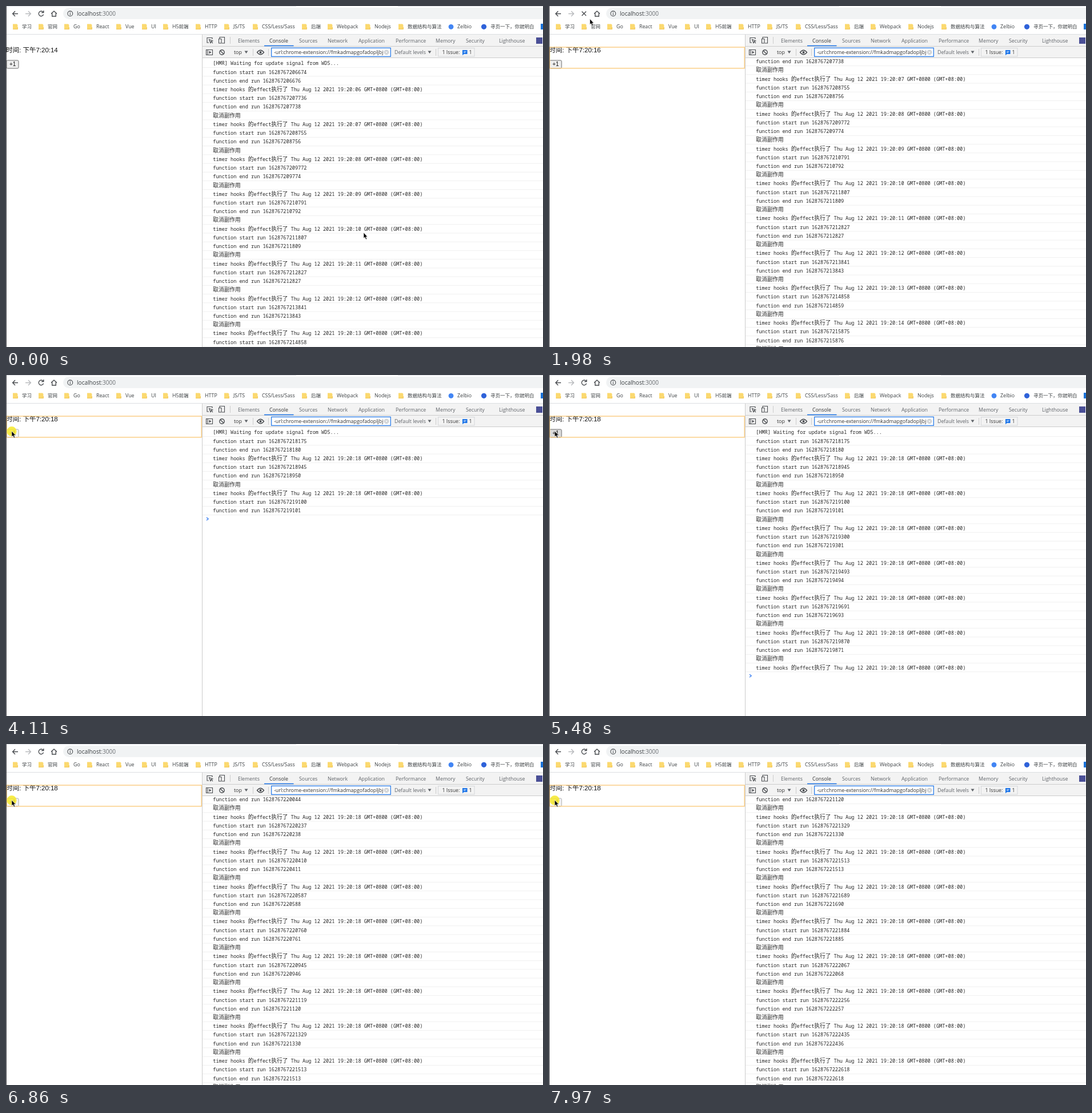
Recreate the animation shown at these times as an HTML page. Size 940x596 px, loop 8000 ms.

```html
<!DOCTYPE html>
<html lang="zh">
<head>
<meta charset="utf-8">
<title>Timer hooks console</title>
<style>
  html, body { margin: 0; width: 100%; height: 100%; overflow: hidden; background: #fff; }
  svg { display: block; width: 940px; height: 596px; }
  text { font-family: "Open Sans", "Noto Sans CJK SC", "Noto Sans CJK", sans-serif; font-size: 8.8px; fill: #3c4043; white-space: pre; }
  .url { font-size: 10.1px; }
  #bookmarks tspan { font-size: 8.5px; }
  .tool text { fill: #5f6368; }
  .tool .dark { fill: #333; }
  .page text { font-family: "Liberation Sans", "Noto Sans CJK SC", "Noto Sans CJK", sans-serif; font-size: 11.5px; fill: #111; }
  .page .label { font-size: 10px; text-anchor: middle; }
  .log text { font-family: "Noto Sans Mono", "Noto Sans CJK SC", "Noto Sans CJK", monospace; font-size: 8.56px; fill: #262626; }
  .log tspan { font-size: 9.7px; }
  .log path { stroke: #f0f0f0; }
  .icon { fill: none; stroke: #4a4d51; stroke-width: 1.4; }
  .sep { stroke: #ccc; fill: none; }
</style>
</head>
<body>
<svg viewBox="0 0 940 596">
  <defs>
    <clipPath id="logClip"><rect x="344" y="91" width="596" height="505"/></clipPath>
    <clipPath id="filterClip"><rect id="filterWindow" x="466" y="73" height="16"/></clipPath>
  </defs>
  <rect width="940" height="596" fill="#fff"/>

  <!-- address bar -->
  <path d="M0 .5H508M686 .5H940" stroke="#dee1e6"/>
  <rect x="100" y="3" width="860" height="20" rx="10" fill="#f1f3f4"/>
  <circle id="reloadHover" cx="61.5" cy="13" r="10" fill="#eceef0"/>
  <g class="icon">
    <path d="M21 13.5H12M16 9L11.6 13.5L16 18"/>
    <path d="M34 13.5H43M39 9L43.4 13.5L39 18" stroke="#b8babd"/>
    <path id="reload" d="M65 10.8A4.3 4.3 0 1 0 65.6 14.8M65.8 8V11.6H62"/>
    <path id="stop" d="M57.5 9.5L65 17M65 9.5L57.5 17"/>
    <path d="M79 13.6L84 9L89 13.6M80.7 12.6V18H87.3V12.6"/>
    <circle cx="112.3" cy="13.3" r="4.4" stroke-width="1.1"/>
    <path d="M112.3 12.6V16M112.3 10.6V11.7" stroke-width="1.1"/>
  </g>
  <text class="url" x="124" y="16.8">localhost<tspan fill="#6b6f73">:3000</tspan></text>
  <g id="bookmarks"></g>
  <circle cx="779" cy="36.3" r="4.4" fill="#4285f4"/>
  <circle cx="836.5" cy="36.3" r="4.6" fill="#2f62d9"/>
  <rect x="936" y="31" width="4" height="10" fill="#1a73d9"/>
  <path d="M0 49.5H940" stroke="#dcdee1"/>

  <!-- web page -->
  <g class="page">
    <text id="clock" x="0" y="80.9"></text>
    <rect id="button" x="1" y="95" width="21" height="14" rx="1.8" stroke="#6b6b6b"/>
    <text class="label" x="11.7" y="105.4">+1</text>
    <rect id="outline" x="1.2" y="72" width="341" height="36.8" fill="none" stroke="#fbcb7f" stroke-width="1.4"/>
  </g>

  <!-- developer tools -->
  <rect x="344" y="50" width="596" height="41" fill="#f3f3f3"/>
  <path class="sep" d="M343.5 50V596M344 70.5H940M344 90.5H940M392.5 54V66M432.5 75V87M459.5 75V87"/>
  <g class="tool">
    <g id="tabs"></g>
    <path d="M452 69.5H503.5" stroke="#1a73e8" stroke-width="1.6"/>
    <rect x="928" y="55" width="11" height="11" fill="#4a4f96"/>
    <g class="icon" stroke-width="1.1">
      <path d="M355 64H352V55.5H361V58M355.5 58.5L361.8 61L359 62L358 64.8ZM359.5 62.5L362 65" stroke-width="1.1"/>
      <path d="M374 57V54.5H382.5V65H378M372.5 57.5H377V65H372.5Z" stroke-width="1.1"/>
      <path d="M350.5 76.5H361.5V85.5H350.5ZM353 76.5V85.5" stroke-width="1.1"/>
      <path d="M355.5 78.5L359.5 81L355.5 83.5Z" fill="#4a4d51" stroke="none"/>
      <circle cx="378" cy="81" r="4.2"/>
      <path d="M375 78L381 84"/>
      <path d="M439.5 81Q445.5 73.5 451.5 81Q445.5 88.5 439.5 81Z" stroke-width="1.3"/>
    </g>
    <circle cx="445.5" cy="81" r="2" fill="#4a4d51"/>
    <text class="dark" x="399" y="84">top</text>
    <path d="M417.5 78.5H423.5L420.5 83Z" fill="#5f6368"/>
    <rect id="filter" x="464.7" y="73.3" height="15" fill="#fff" stroke="#1a73e8" stroke-width="1.2"/>
    <g clip-path="url(#filterClip)">
      <text class="dark" x="469" y="84.4" style="font-size:8.87px">-url:chrome-extension://fmkadmapgofadopljbjfkapdk</text>
    </g>
    <g id="levels">
      <circle cx="666" cy="80.8" r="4.4" fill="#d0d2d4"/>
      <path d="M664.2 79L667.8 82.6M667.8 79L664.2 82.6" stroke="#fff"/>
      <text x="680" y="84">Default levels</text>
      <path d="M738.5 78.5H744.5L741.5 83Z" fill="#5f6368"/>
      <path class="sep" d="M752.5 75V87"/>
      <rect x="756.5" y="73.5" width="63.5" height="14.5" fill="#f3f3f3" stroke="#d5d7da"/>
      <text id="noIssues" class="dark" x="768" y="84">No Issues</text>
      <g id="oneIssue">
        <text class="dark" x="763.5" y="84">1 Issue:</text>
        <path d="M799 77H807.5V84H801.5L799 86.2Z" fill="#1a73e8"/>
        <path d="M801 79.5H805.5M801 81.5H804.5" stroke="#fff" stroke-width=".8"/>
        <text class="dark" x="810.5" y="84">1</text>
      </g>
    </g>
  </g>
  <g clip-path="url(#logClip)">
    <g id="log" class="log"></g>
    <path id="prompt" d="M351 96.8L354.2 99.3L351 101.8" fill="none" stroke="#367cf1" stroke-width="1.3"/>
  </g>

  <path d="M.5 0V596" stroke="#4b4b4f"/>
  <circle id="press" r="8.5" fill="#f6e92c" opacity=".86"/>
  <path id="cursor" d="M0 0V10L2.2 8L4 12L5.7 11.3L4 7.4H6.8Z" fill="#000" stroke="#fff" stroke-width=".6"/>
</svg>

<script>
const LOOP = 8000, ROW = 15.23, FIT_ROWS = 34.8;
const CLEARED = 2000, LOADED = 3700;
const $ = id => document.getElementById(id);
const show = (id, on) => $(id).setAttribute('visibility', on ? 'visible' : 'hidden');
const within = (t, a, b) => t >= a && t < b;

// Piecewise linear value from [position, ...values] stops
function track(stops, p) {
  let i = stops.findIndex(s => s[0] > p);
  if (i < 0) return stops[stops.length - 1].slice(1);
  if (i === 0) return stops[0].slice(1);
  const a = stops[i - 1], b = stops[i], k = (p - a[0]) / (b[0] - a[0]);
  return a.slice(1).map((v, j) => v + (b[j + 1] - v) * k);
}

// Chinese runs get a tspan, as they are set in their own size
function label(s, x, y, cls = '') {
  const text = s.replace(/[\u4e00-\u9fa5，]+/g, '<tspan>$&</tspan>');
  return `<text x="${x}" y="${y}" class="${cls}">${text}</text>`;
}

const bookmarks = [['学习', 28], ['官网', 73], ['Go', 118], ['React', 158], ['Vue', 209], ['UI', 254],
  ['H5前端', 291], ['HTTP', 348], ['JS/TS', 398], ['CSS/Less/Sass', 448], ['后端', 534],
  ['Webpack', 579], ['Nodejs', 645], ['数据结构与算法', 703]];
const folder = x => `<path d="M${x - 16} 31.5H${x - 9}L${x - 7.6} 33V41H${x - 16}Z" fill="#fbd970"/>
  <path d="M${x - 16} 40.5H${x - 7.6}V37" fill="none" stroke="#f2c85a"/>`;
$('bookmarks').innerHTML = bookmarks.map(([s, x]) => folder(x) + label(s, x, 39.3)).join('') +
  label('Zelbio', 790, 39.3) + label('寻页一下，你就明白', 848, 39.3);

const tabs = [['Elements', 406], ['Console', 461], ['Sources', 513], ['Network', 563], ['Application', 617],
  ['Performance', 682], ['Memory', 752], ['Security', 805], ['Lighthouse', 863]];
$('tabs').innerHTML = tabs.map(([s, x]) => label(s, x, 63.6, s === 'Console' ? 'dark' : '')).join('');

// Render times in ms after 1628767200000, with the length of each render
const before = [[6674, 2], [7736, 2], [8755, 1], [9772, 2], [10791, 1], [11807, 2], [12827, 0],
  [13841, 2], [14858, 1], [15875, 1]];
const after = [[18175, 5], [18945, 5], [19100, 1], [19300, 1], [19493, 1], [19691, 2], [19870, 1],
  [20042, 2], [20237, 1], [20410, 1], [20587, 1], [20760, 1], [20945, 1], [21119, 1], [21329, 1],
  [21513, 0], [21689, 1], [21884, 1], [22067, 1], [22256, 1], [22435, 1], [22618, 0], [22800, 1]];
const pace = [[18175, 3700], [18945, 3900], [19691, 4800], [19870, 5150], [20042, 5750],
  [21119, 6340], [22067, 7315], [22800, 8050]];
const clicks = after.slice(1).map(([ms]) => track(pace, ms)[0]);

// Each run logs its render first and its effect a little later
function buildLog(runs, renderAt, effectAt, second) {
  const rows = [{ text: '[HMR] Waiting for update signal from WDS...', at: renderAt(runs[0][0]) }];
  runs.forEach(([ms, length], i) => {
    const add = (text, at) => rows.push({ text, at });
    const stamp = n => 1628767200000 + n;
    add('function start run ' + stamp(ms), renderAt(ms));
    add('function end run ' + stamp(ms + length), renderAt(ms));
    if (i) add('取消副作用', effectAt(ms));
    const sec = String(second(ms)).padStart(2, '0');
    add(`timer hooks 的effect执行了 Thu Aug 12 2021 19:20:${sec} GMT+0800 (GMT+08:00)`, effectAt(ms));
  });
  return rows;
}
const firstLog = buildLog(before, ms => ms > 15000 ? 1860 : 0,
  ms => ms > 15000 ? 1930 : ms > 14000 ? 890 : 0, ms => Math.floor(ms / 1000));
const secondLog = buildLog(after, ms => track(pace, ms)[0], ms => track(pace, ms)[0] + 80, () => 18);

let drawn = '';
function drawLog(t) {
  const log = t < CLEARED ? firstLog : secondLog;
  const count = log.filter(r => r.at <= t).length;
  const key = (t < CLEARED) + ':' + count;
  if (key === drawn) return;
  drawn = key;
  const scroll = Math.max(0, count - FIT_ROWS) * ROW;
  $('log').innerHTML = log.slice(0, count).map((row, i) => {
    const y = i * ROW - scroll;
    if (y < -25 || y > 520) return '';
    return label(row.text, 362.3, (y + 103.3).toFixed(2)) + `<path d="M344 ${(y + 107.6).toFixed(2)}H940"/>`;
  }).join('');
  $('prompt').setAttribute('transform', `translate(0 ${count * ROW - scroll})`);
}

const cursorPath = [[70, 626, 396], [250, 540, 330], [600, 200, 115], [820, 75, 25], [1100, 62, 11.5],
  [1860, 62, 11.5], [2150, 85, 38], [2600, 132, 83], [2670, 134, 85], [2810, 134, 85], [2930, 98, 148],
  [3070, 52, 104], [3230, 52, 104], [3370, 10, 98]];

function drawToolbar(t) {
  const loading = within(t, 1860, LOADED);
  const counting = within(t, CLEARED, 2670);
  const shift = counting ? 17 : within(t, CLEARED, LOADED) ? 9 : 0;
  show('reload', !loading);
  show('stop', loading);
  show('reloadHover', within(t, 1030, 1930));
  show('noIssues', counting);
  show('oneIssue', !counting);
  $('filter').setAttribute('width', 208.5 + shift);
  $('filterWindow').setAttribute('width', 195 + shift);
  $('levels').setAttribute('transform', `translate(${shift} 0)`);
}

function drawPage(t) {
  const second = t < 960 ? 14 : t < 1930 ? 15 : t < LOADED ? 16 : 18;
  const clicking = clicks.some(c => within(t, c - 90, c + 70));
  const [x, y] = track(cursorPath, t);
  $('clock').textContent = '时间: 下午7:20:' + second;
  $('button').setAttribute('fill', clicking ? '#f5f5f5' : t >= 3330 ? '#dcdcdc' : '#efefef');
  $('button').setAttribute('stroke', clicking ? '#aaa' : '#6b6b6b');
  show('outline', within(t, 70, 330) || within(t, 960, 1170) || within(t, 1930, 2140) || t >= 3830);
  show('press', clicking || within(t, 1580, 1710));
  $('press').setAttribute('transform', `translate(${x} ${y + .5})`);
  $('cursor').setAttribute('transform', `translate(${x} ${y})`);
}

const start = performance.now();
function frame() {
  const t = (performance.now() - start) % LOOP;
  drawToolbar(t);
  drawPage(t);
  drawLog(t);
  requestAnimationFrame(frame);
}
frame();
</script>
</body>
</html>
```
